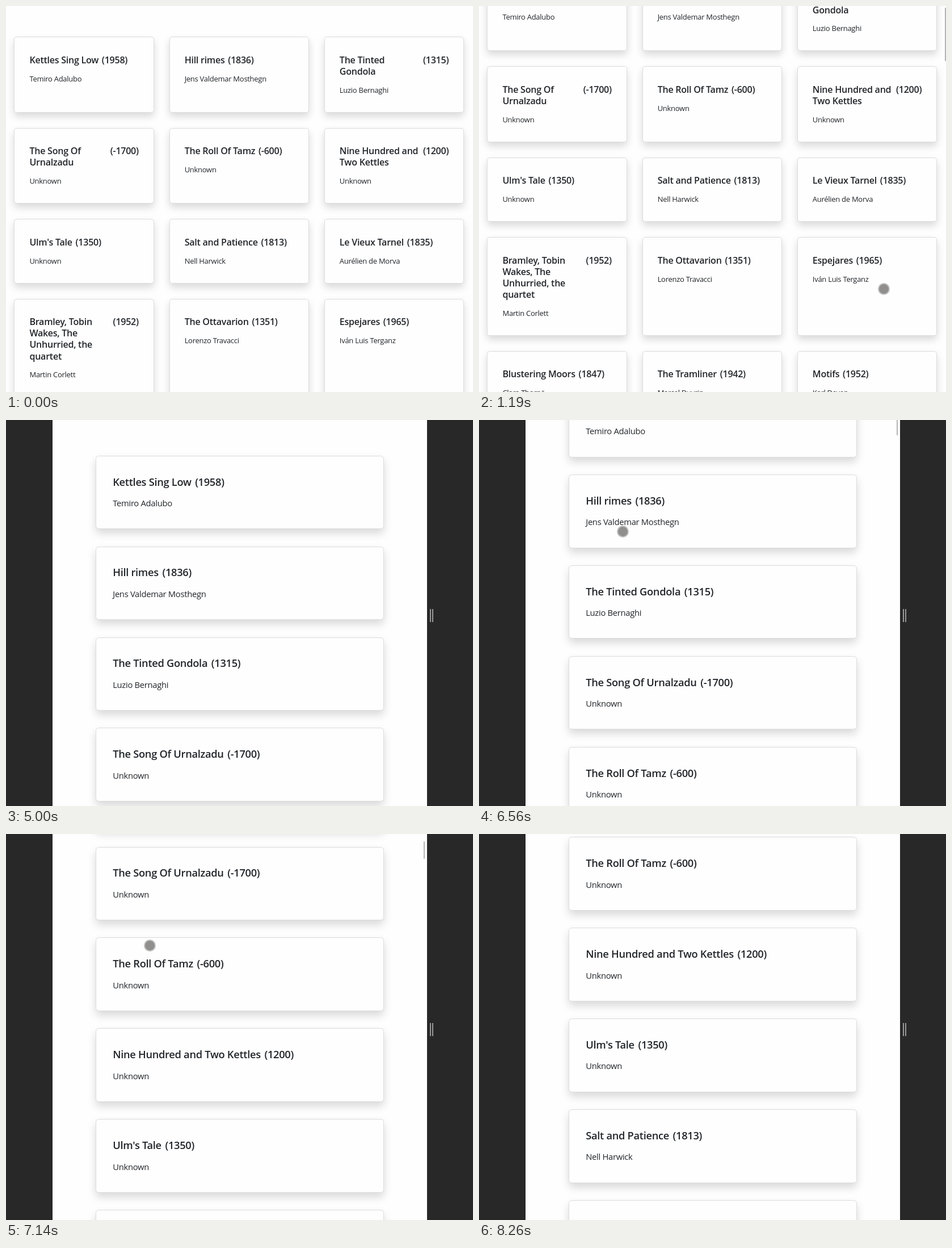
Animation of 823 by 680 pixels, one loop 9.37 s. Source, as an HTML page:

```html
<!DOCTYPE html>
<html lang="en">
<head>
<meta charset="utf-8">
<title>Book cards</title>
<style>
  html, body { margin: 0; width: 100%; height: 100%; overflow: hidden; background: #282828; }
  #stage { position: relative; width: 823px; height: 680px; overflow: hidden; }
  .page {
    position: absolute; top: 0; height: 680px; overflow: hidden; background: #fefefe;
    font-family: "Open Sans", "Noto Sans", sans-serif; letter-spacing: -.02em; color: #212529;
  }
  #wide { left: 0; width: 823px; font-size: 13.4px; }
  #narrow { left: 82px; width: 660px; font-size: 15.25px; }
  .list { position: absolute; top: 0; left: 0; }
  .card {
    position: absolute; box-sizing: border-box; padding: 2.22em 1.95em 0; background: #fefefe;
    border: 1px solid #dcdcdc; border-radius: .36em; box-shadow: 0 .5em 1em rgba(0, 0, 0, .15);
  }
  .head { display: flex; gap: .36em; font-size: 1.2em; font-weight: 600; line-height: 1.25; white-space: pre; }
  .wrapped b { flex: 1; }
  .head b { font-weight: inherit; }
  .author { margin-top: .98em; font-size: .97em; line-height: 1.55; white-space: nowrap; }
  .bar { position: absolute; width: 2.5px; border-radius: 1px; background: #b4b4b4; }
  #wide .bar { left: 821px; height: 93.5px; }
  #narrow .bar { left: 653.5px; height: 31px; }
  .grip { position: absolute; left: 747px; top: 333px; width: 2px; height: 23px; border: solid #989898; border-width: 0 2px; }
  #pointer {
    position: absolute; left: -10.5px; top: -10.5px; box-sizing: border-box; width: 21px; height: 21px;
    border: 2px solid #c2c2c2; border-radius: 50%; background: rgba(128, 126, 124, .87);
  }
</style>
</head>
<body>
<div id="stage">
  <div class="grip"></div>
  <div class="page" id="wide"><div class="list"></div><div class="bar"></div></div>
  <div class="page" id="narrow"><div class="list"></div><div class="bar"></div></div>
  <div id="pointer"></div>
</div>
<script>
const LOOP = 9370, NARROW_AT = 5000;

// title (| breaks the line in the grid), year, author
const books = `Kettles Sing Low;1958;Temiro Adalubo
Hill rimes;1836;Jens Valdemar Mosthegn
The Tinted|Gondola;1315;Luzio Bernaghi
The Song Of|Urnalzadu;-1700;Unknown
The Roll Of Tamz;-600;Unknown
Nine Hundred and|Two Kettles;1200;Unknown
Ulm's Tale;1350;Unknown
Salt and Patience;1813;Nell Harwick
Le Vieux Tarnel;1835;Aurélien de Morva
Bramley, Tobin|Wakes, The|Unhurried, the|quartet;1952;Martin Corlett
The Ottavarion;1351;Lorenzo Travacci
Espejares;1965;Iván Luis Terganz
Blustering Moors;1847;Clara Thornë
The Tramliner;1942;Marcel Duvrin
Motifs;1952;Karl Deven
Tin Harbours;1915;Unknown
The Salt Clerk;1926;Unknown
Paper Herons;1924;Unknown`.split('\n').map(row => row.split(';'));

const $ = selector => document.querySelector(selector);
const linear = p => p;
const easeIn = n => p => p ** n;
const easeOut = n => p => 1 - (1 - p) ** n;

// A move runs in equal steps; the first step lands at start, the last at end.
const move = (start, end, steps, from, to, ease = linear) => ({ start, end, steps, from, to, ease });

const scrolls = [
  move(620, 740, 2, [0], [186], easeIn(2)),
  move(1070, 1410, 4, [186], [0], easeIn(1.26)),
  move(6560, 7360, 8, [0], [559], easeOut(1.92)),
  move(7590, 7690, 2, [559], [697]),
];
const glides = [
  move(280, 410, 2, [725, 532], [713, 498]),
  move(1740, 2090, 4, [713, 498], [609, 159]),
  move(2370, 2440, 2, [609, 159], [553, 91]),
  move(5450, 5670, 3, [397, -49], [253, 196]),
  move(8040, 8260, 3, [253, 196], [323, 799]),
];

function valueAt(moves, t) {
  const current = moves.findLast(m => m.start <= t);
  if (!current) return moves[0].from;
  const { start, end, steps, from, to, ease } = current;
  const step = Math.min(steps, 1 + Math.floor((t - start) / (end - start) * (steps - 1) + .03));
  return from.map((a, i) => a + (to[i] - a) * ease(step / steps));
}

const within = (t, start, end) => t >= start && t < end;
const show = (element, visible) => { element.style.display = visible ? 'block' : 'none'; };

function addCard(list, [title, year, author], x, y, w, h, breaks) {
  const text = title.replaceAll('|', breaks ? '\n' : ' ');
  const wrapped = text.includes('\n') ? ' wrapped' : '';
  list.insertAdjacentHTML('beforeend',
    `<div class="card" style="left:${x}px;top:${y}px;width:${w}px;height:${h}px">
      <div class="head${wrapped}"><b>${text}</b><span>(${year})</span></div>
      <div class="author">${author}</div></div>`);
}

function buildGrid() {
  let y = 54;
  for (let i = 0; i < books.length; i += 3) {
    const row = books.slice(i, i + 3);
    const lines = Math.max(...row.map(book => book[0].split('|').length));
    const height = 93.5 + 20 * lines;
    row.forEach((book, col) => addCard($('#wide .list'), book, 14.3 + 273.2 * col, y, 246.7, height, true));
    y += height + 27;
  }
}

function buildColumn() {
  books.forEach((book, i) => addCard($('#narrow .list'), book, 75.5, 62.7 + 159.93 * i, 508.5, 129.3, false));
}

function drawPage(id, visible, scroll, barVisible, barTop) {
  show($(id), visible);
  show($(id + ' .bar'), barVisible);
  $(id + ' .list').style.top = -scroll + 'px';
  $(id + ' .bar').style.top = barTop + 'px';
}

function frame() {
  const t = performance.now() % LOOP;
  const narrow = t >= NARROW_AT;
  const [scroll] = valueAt(scrolls, t);
  const [x, y] = valueAt(glides, t);
  drawPage('#wide', !narrow, scroll, within(t, 620, 1860), scroll * .136 - 11.5);
  drawPage('#narrow', narrow, scroll, within(t, 6560, 8150), scroll * .0432 - 9.5);
  show($('#pointer'), within(t, 280, 2440) || within(t, 5450, 8260));
  $('#pointer').style.transform = `translate(${x}px, ${y}px)`;
  requestAnimationFrame(frame);
}

buildGrid();
buildColumn();
frame();
</script>
</body>
</html>
```
